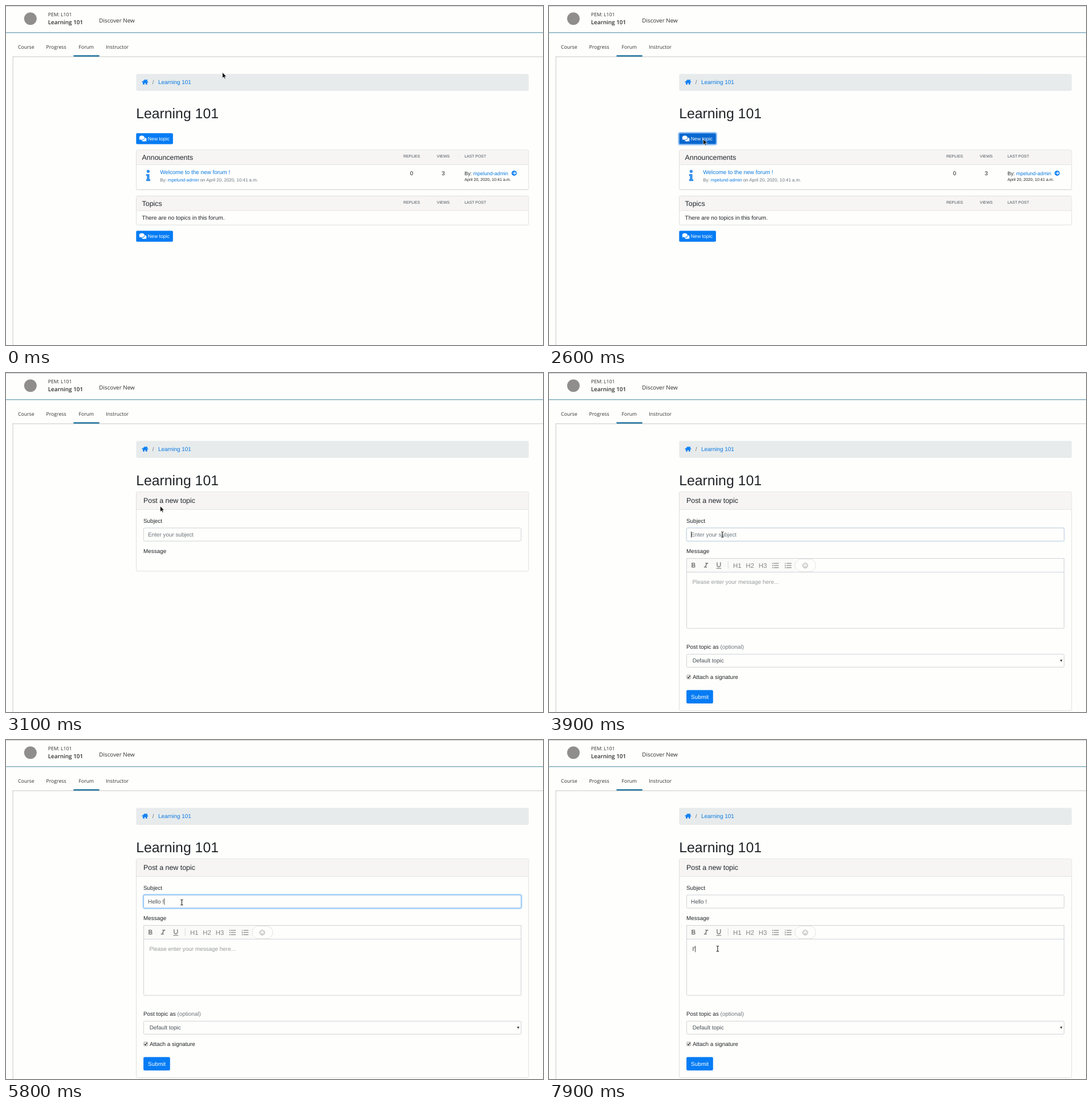
Write an HTML page that moves like this. It is 942 px wide and 595 px high and loops after 8 s.

```html
<!DOCTYPE html>
<html lang="en">
<head>
<meta charset="utf-8">
<title>Forum: new topic</title>
<style>
  html, body { margin: 0; width: 100%; height: 100%; overflow: hidden; background: #fefefc; }
  svg { display: block; width: 100%; height: 100%; }
  text { font-family: "Liberation Sans", Arial, sans-serif; font-size: 9.92px; fill: #212529;
         text-rendering: geometricPrecision; white-space: pre; }
  .nav { font-family: "Open Sans", sans-serif; fill: #2f2f2f; }
  .link { fill: #0b7ae2; }
  .muted { fill: #6c757d; }
  .field { fill: #495057; }
  .white { fill: #fff; }
  .tool { fill: #858585; }
</style>
</head>
<body>
<svg id="stage" viewBox="0 0 942 595" xmlns="http://www.w3.org/2000/svg"></svg>
<script>
const PERIOD = 8000, TICK = 100;
const BLUE = '#067cf4', LINE = '#dfdfdd', FIELD = '#ced3d7', USER = 'mpelund-admin';
const DATE = 'April 20, 2020, 10:41 a.m.';

const text = (x, y, s, size = 9.92, cls = '', extra = '') =>
  `<text x="${x}" y="${y}" class="${cls}" style="font-size:${size}px" ${extra}>${s}</text>`;
const rect = (x, y, w, h, fill, stroke = 'none', r = 0, extra = '') =>
  `<rect x="${x}" y="${y}" width="${w}" height="${h}" fill="${fill}" stroke="${stroke}" rx="${r}" ${extra}/>`;
const icon = (x, y, scale, d, fill) =>
  `<path transform="translate(${x} ${y}) scale(${scale})" d="${d}" fill="${fill}"/>`;
const group = (id, body) => `<g id="${id}">${body}</g>`;
const mid = 'text-anchor="middle"';

const ICONS = {
  home: 'M288 115 96 273V464q0 16 16 16H224q16 0 16-16V352q0-16 16-16h64q16 0 16 16V464q0 16 16 16H464q16 0 16-16V273ZM573 251 488 181V44q0-12-12-12H420q-12 0-12 12V115L318 42q-30-22-61 0L3 251q-7 8-1 17l26 31q8 7 17 1L279 108q9-6 18 0L531 300q9 6 17-1l26-31q6-9-1-17Z',
  comments: 'M416 192c0-88-93-160-208-160S0 104 0 192c0 34 14 66 38 92-13 30-36 54-36 54-5 6-1 14 6 14 37 0 67-12 89-25 32 16 70 25 111 25 115 0 208-72 208-160zM538 412c24-26 38-58 38-92 0-67-53-124-129-148 16 110-80 212-239 212-11 0-21-1-32-2C208 440 282 480 368 480c41 0 79-9 111-25 22 13 52 25 89 25 7 0 11-8 6-14 0 0-23-24-36-54z',
  info: 'M20 424H40V280H20Q0 280 0 260V212Q0 192 20 192H132Q152 192 152 212V424H172Q192 424 192 444V492Q192 512 172 512H20Q0 512 0 492V444Q0 424 20 424ZM96 0a72 72 0 1 0 .1 0Z',
  bold: 'M15.6 10.8c1-.7 1.65-1.8 1.65-2.8 0-2.3-1.75-4-4-4H7v14h7c2.1 0 3.75-1.7 3.75-3.8 0-1.5-.9-2.8-2.15-3.4zM10 6.5h3a1.5 1.5 0 0 1 0 3h-3zM13.5 15.5H10v-3h3.5a1.5 1.5 0 0 1 0 3z',
  italic: 'M10 4v3h2.2l-3.4 8H6v3h8v-3h-2.2l3.4-8H18V4z',
  underline: 'M12 17c3.3 0 6-2.7 6-6V3h-2.5v8a3.5 3.5 0 0 1-7 0V3H6v8c0 3.3 2.7 6 6 6zM5 19v2h14v-2z',
  bars: 'M7 5h14v2H7zM7 11h14v2H7zM7 17h14v2H7z',
  dots: 'M4 4.5a1.5 1.5 0 1 0 .1 0zM4 10.5a1.5 1.5 0 1 0 .1 0zM4 16.5a1.5 1.5 0 1 0 .1 0z',
  digits: 'M2 4h2v4H3V5H2zM2 10h3v1l-1.8 2H5v1H2v-1l1.8-2H2zM2 16h3v4H2v-1h2v-.5H3v-1h1V17H2z'
};

function pageHeader() {
  const tabs = [[21, 'Course'], [70.5, 'Progress'], [127.5, 'Forum'], [175.3, 'Instructor']];
  return rect(0, 0, 942, 1, '#c9c9c8') + rect(0, 46, 942, 1.4, '#76a8bb') +
    '<circle cx="42.8" cy="22.3" r="11" fill="#8f8e8d"/>' +
    text(73.7, 18.2, 'PEM: L101', 8.68, 'nav') +
    text(73.7, 32, 'Learning 101', 9.92, 'nav', 'font-weight="600"') +
    text(163.2, 28.5, 'Discover New', 9.92, 'nav') +
    tabs.map(([x, s]) => text(x, 75.1, s, 8.68, 'nav',
      s === 'Forum' ? 'style="" fill="#1b6f9c"' : '')).join('') +
    rect(11.6, 88.5, 931, 1.1, '#cececc') + rect(11.6, 88.5, 1.1, 507, '#cececc') +
    rect(118.5, 86.4, 45.2, 2.4, '#1b6f9c');
}

function topicButton(id, y) {
  return group(id, rect(228.3, y, 64.6, 19.3, BLUE, 'none', 2)) +
    icon(233.6, y + 3.6, .0226, ICONS.comments, '#fff') +
    text(248.8, y + 12.8, 'New topic', 8.68, 'white');
}

function card(top, bottom, split) {
  return rect(228.5, top, 688.3, bottom - top, '#fefefc', LINE, 2.2) +
    rect(229, top + .5, 687.3, split - top, '#f6f5f4', 'none', 1.8) +
    rect(229, split, 687.3, .8, LINE);
}

function listCard(top, bottom, title) {
  return card(top, bottom, top + 25.2) + text(238.6, top + 17.3, title, 12.4) +
    text(711.6, top + 13.1, 'REPLIES', 6.94, 'field', mid) +
    text(767, top + 13.1, 'VIEWS', 6.94, 'field', mid) +
    text(804.2, top + 13.1, 'LAST POST', 6.94, 'field');
}

function forumList() {
  return topicButton('mainButton', 223.2) +
    rect(227.3, 222.2, 66.6, 21.3, 'none', '#8dbff6', 3, 'id="buttonRing" stroke-width="2"') +
    listCard(252.8, 322.5, 'Announcements') + rect(229, 321.8, 687, 1.1, '#d5d5d3') +
    icon(245.7, 287.5, .0388, ICONS.info, '#3590ea') +
    text(270.2, 294.7, 'Welcome to the new forum !', 9.92, 'link') +
    text(270.2, 307.9, `By: <tspan class="link">${USER}</tspan> on ${DATE}`, 7.936, 'muted') +
    text(711.5, 297.2, '0', 9.92, '', mid) + text(767, 297.2, '3', 9.92, '', mid) +
    text(804.2, 296.8, `By: <tspan class="link">${USER}</tspan>`, 8.93) +
    `<circle cx="891.4" cy="293.4" r="4.5" fill="${BLUE}"/>` +
    '<path d="M888.7 293.4h5M891.5 290.9l2.5 2.5-2.5 2.5" fill="none" stroke="#fff" stroke-width="1.2"/>' +
    text(804.2, 306.5, DATE, 7.14) +
    listCard(333.5, 384.3, 'Topics') +
    text(238.6, 374.8, 'There are no topics in this forum.') +
    topicButton('lowerButton', 394.4);
}

function editor() {
  const tool = (x, d) => icon(x - 7.44, 330.4, .62, d, '#858585');
  return rect(241.5, 325.5, 662, 24, '#fefefc', FIELD) +
    rect(242, 326, 190, 23, '#fafaf9') +
    rect(241.5, 349.5, 662, 98.7, '#fefefc', FIELD, 1.5) +
    tool(253.2, ICONS.bold) + tool(275.5, ICONS.italic) + tool(297.8, ICONS.underline) +
    rect(313.8, 330, .8, 13.5, '#d5d5d5') +
    [330.2, 352.6, 375].map((x, i) => text(x, 341.5, 'H' + (i + 1), 11.4, 'tool', mid)).join('') +
    tool(397.4, ICONS.bars + ICONS.dots) + tool(419.8, ICONS.bars + ICONS.digits) +
    rect(431.6, 326.4, 36.4, 22.4, '#fefefc', '#dcdcdb', 11.2, 'stroke-width=".8"') +
    '<circle cx="449.5" cy="338" r="4.3" fill="none" stroke="#858585" stroke-width=".8"/>' +
    '<path d="M447.2 339.3q2.3 2.6 4.6 0" fill="none" stroke="#858585" stroke-width=".8"/>' +
    '<circle cx="448" cy="336.7" r=".65" fill="#858585"/><circle cx="451" cy="336.7" r=".65" fill="#858585"/>' +
    '<text id="message" x="251.5" y="370.2"></text>' +
    text(241, 484, 'Post topic as <tspan class="muted">(optional)</tspan>') +
    rect(241.4, 493.5, 662.2, 22.8, '#fefefc', FIELD, 2.2) +
    text(251.7, 508.3, 'Default topic', 9.92, 'field') +
    '<path d="M896.4 503.3h4.2l-2.1 3.8z" fill="#333"/>' +
    rect(241.8, 530.2, 6.6, 6.6, '#f2f2f1', '#8b8b8b', 1, 'stroke-width=".8"') +
    '<path d="M243 533.6l1.6 1.7 2.8-3.9" fill="none" stroke="#222" stroke-width="1.2"/>' +
    text(252, 537.4, 'Attach a signature') +
    rect(241.1, 556.4, 46.7, 23.5, BLUE, 'none', 2.2) + text(249.1, 571.6, 'Submit', 9.92, 'white');
}

function topicForm() {
  return group('shortCard', card(208.8, 347.8, 239)) + group('tallCard', card(208.8, 592.6, 239)) +
    text(241, 228.2, 'Post a new topic', 12.4) + text(241, 262.6, 'Subject') +
    rect(241.4, 272, 662.2, 23, '#fefefc', FIELD, 2.2) +
    group('focusRing',
      rect(240.4, 271, 664.2, 25, 'none', '#bfdefa', 3.2, 'stroke-width="2.2"') +
      rect(241.4, 272, 662.2, 23, 'none', '#80bdf8', 2.2)) +
    '<text id="subject" x="249" y="286.9"></text>' +
    text(241, 316, 'Message') + group('editor', editor()) +
    rect(0, 0, .9, 11, '#333', 'none', 0, 'id="caret"');
}

const stage = document.getElementById('stage');
stage.innerHTML = rect(0, 0, 942, 595, '#fefefc') + pageHeader() +
  group('content',
    rect(228.3, 119.3, 688.6, 29.6, '#e7ebec', 'none', 2.4) +
    icon(238.2, 128.3, .0198, ICONS.home, BLUE) +
    text(256.8, 137.3, '/', 9.92, 'muted') + text(267, 137.3, 'Learning 101', 9.92, 'link') +
    text(228.2, 197.4, 'Learning 101', 24.8) +
    group('list', forumList()) + group('form', topicForm())) +
  group('pointer',
    '<path id="arrow" d="M.4.4V10.8L2.8 8.6 4.5 12 6.1 11.3 4.5 7.9H7.6Z" fill="#111" stroke="#fff" stroke-width=".7"/>' +
    '<path id="hand" d="M1.3 1.2q1.2-.6 1.6.6V5l3 .7q1 .4.9 1.4L6.2 11H2.4L.3 7.8Q0 6.8 1.3 7Z" fill="#111" stroke="#ddd" stroke-width=".6"/>' +
    '<path id="beam" d="M-2.2-4.8Q0-4.8 0-3.8Q0-4.8 2.2-4.8M0-4V4M-2.2 4.8Q0 4.8 0 3.8Q0 4.8 2.2 4.8" fill="none" stroke="#222" stroke-width="1.1"/>');

const ui = {};
stage.querySelectorAll('[id]').forEach(el => ui[el.id] = el);
const show = (el, on) => el.setAttribute('visibility', on ? 'inherit' : 'hidden');
const clamp = v => Math.max(0, Math.min(1, v));

// Pointer moves: first step, last step, destination.
const MOVES = [
  [700, 700, 378.6, 126], [900, 900, 380, 149], [1100, 1500, 270, 233],
  [3300, 3800, 304.2, 283.5], [4000, 4200, 308.4, 285],
  [6400, 6600, 291, 350.5], [6800, 6900, 295.8, 366.3]
];

function pointerAt(t) {
  let x = 379.2, y = 116;
  for (const [from, to, tx, ty] of MOVES) {
    const k = clamp((t - from + TICK) / (to - from + TICK));
    x += (tx - x) * k;
    y += (ty - y) * k;
  }
  return [x, y];
}

// Typing: the times at which each letter appears.
const typed = (s, times, t) => s.slice(0, times.filter(at => t >= at).length);
const between = (t, a, b) => t >= a && t < b;

function setField(el, value, hint, hintColor, color) {
  el.textContent = value || hint;
  el.style.fill = value ? color : hintColor;
  return value ? el.getComputedTextLength() : 0;
}

function render(ms) {
  const t = Math.floor(ms / TICK) * TICK;
  const inForm = t >= 3100, ready = t >= 3200;
  show(ui.content, !between(t, 3000, 3100));
  show(ui.list, t < 3000);
  show(ui.form, inForm);
  show(ui.shortCard, inForm && !ready);
  show(ui.tallCard, ready);
  show(ui.editor, ready);

  ui.mainButton.firstChild.setAttribute('fill', t >= 1500 ? '#0867cf' : BLUE);
  show(ui.buttonRing, between(t, 2500, 3000));

  const focus = t < 7100 ? clamp((t - 3850) / 300) : clamp((7200 - t) / 200);
  ui.focusRing.setAttribute('opacity', focus);

  const subject = typed('Hello !', [5000, 5200, 5300, 5400, 5500, 5600, 5800], t);
  const subjectWidth = setField(ui.subject, subject, 'Enter your subject', '#6c757d', '#495057');
  const message = typed("I'", [7700, 7900], t);
  const messageWidth = setField(ui.message, message, 'Please enter your message here...', '#969a9d', '#212529');

  const inMessage = t >= 7100;
  ui.caret.setAttribute('x', inMessage ? 251.6 + messageWidth : 249.2 + subjectWidth);
  ui.caret.setAttribute('y', inMessage ? 361.3 : 278);
  show(ui.caret, between(t, 3900, 4500) || between(t, 5000, 6400) || between(t, 7100, 7600) || t >= 7700);

  const [x, y] = pointerAt(t);
  const overText = ready && (between(y, 272, 296) || between(y, 349, 449));
  const overButton = between(t, 1500, 2600);
  ui.pointer.setAttribute('transform', `translate(${x.toFixed(2)} ${y.toFixed(2)})`);
  show(ui.beam, overText);
  show(ui.hand, overButton);
  show(ui.arrow, !overText && !overButton);
}

const start = performance.now();
function loop() {
  render((performance.now() - start) % PERIOD);
  requestAnimationFrame(loop);
}
loop();
</script>
</body>
</html>
```
